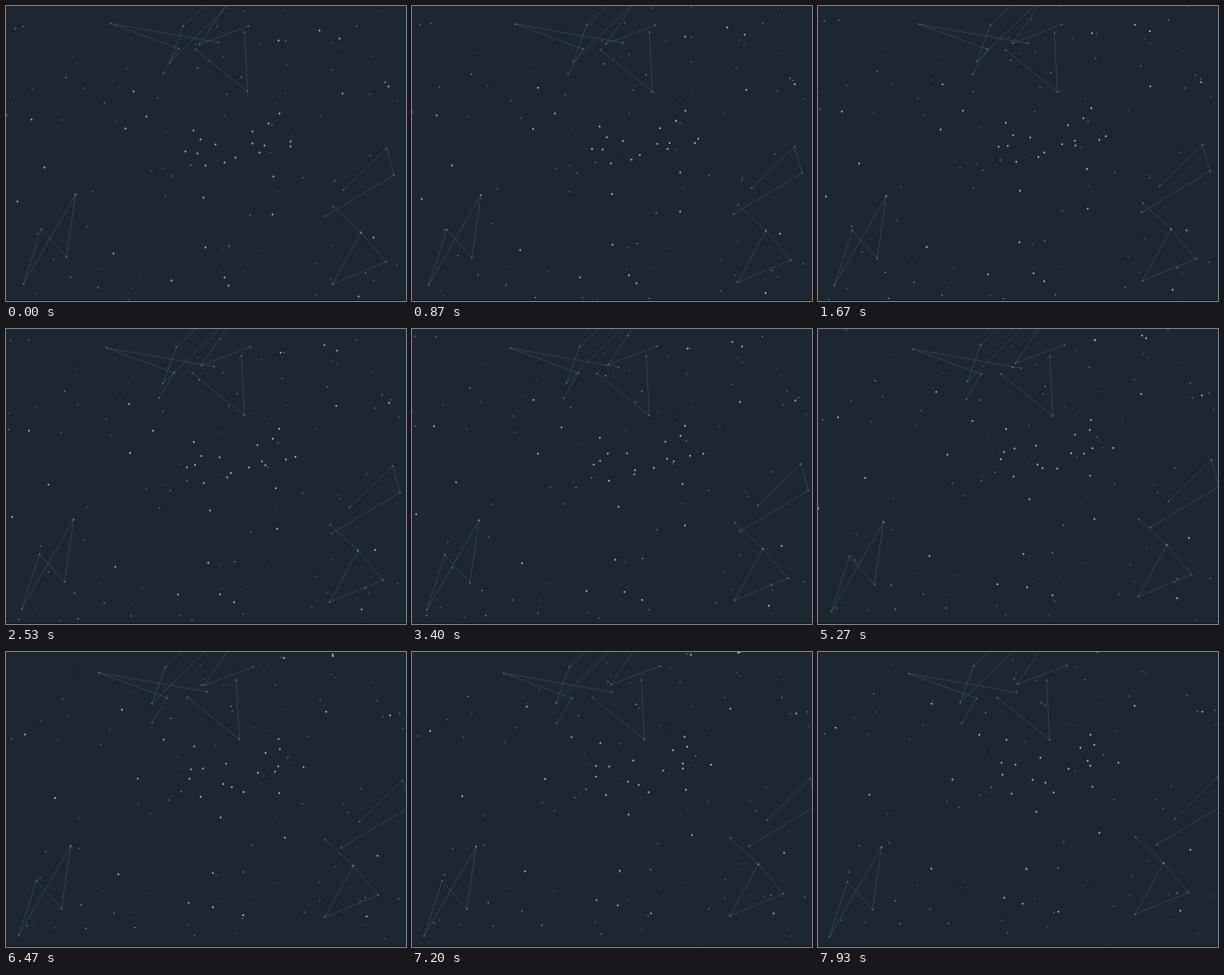
Recreate the animation shown at these times as an HTML page with a canvas. Size 400 px wide and 295 px high, loop 8000 ms.

```html
<!DOCTYPE html>
<html lang="en">
<head>
<meta charset="utf-8">
<title>Drifting stars</title>
<style>
  html, body { margin: 0; width: 100%; height: 100%; overflow: hidden; background: #1c2731; }
  canvas { display: block; }
</style>
</head>
<body>
<canvas id="sky" width="400" height="295"></canvas>
<script>
const WIDTH = 400, HEIGHT = 295;
const LOOP = 8000, FRAME = 1000 / 15, TRAVEL = 7930;
const ctx = document.getElementById('sky').getContext('2d');

// Each constellation is one stroke that drifts rigidly by `move` over TRAVEL ms.
const constellations = [
  { move: [-14, 4], points: [[157, 67], [172, 42], [104, 17], [212, 36]] },
  { move: [-21.5, -6], points: [[208, -10], [176.5, 19.5], [163, 56], [231, -10]] },
  { move: [-10, 2.3], points: [[189, 43], [241, 85], [238, 25.5]] },
  { move: [6, -6.5], points: [[220, -2], [193, 38], [242, 19.5]] },
  { move: [19.5, -17.5], points: [[337, 183.5], [380, 142], [387.5, 168.5], [319, 209.5]] },
  { move: [-9.5, -15.7], points: [[326.5, 200], [354.5, 226], [326, 277.5], [379.5, 255.5], [354.5, 226]] },
  { move: [-6, 6.7], points: [[69, 188], [17, 277.5], [35, 222.5], [60, 250.5], [69, 188]] }
];

// Bright stars: x, y, then drift over TRAVEL ms.
const brightStars = [
  [127, 85, -14, -34], [119, 122, 15, 5], [140, 110, 21, -28], [273, 107, -1, -25],
  [246, 125, 16, -30], [246, 137, -11, 3], [253, 146, 19, -33], [258, 139, -8, -23],
  [284, 135, 16, -25], [284, 140, -15, -32], [187, 124, 1, -37], [194, 133, 3, -21],
  [209, 138, 13, -33], [191, 147, -8, -37], [179, 145, 5, -23], [199, 159, -6, -18],
  [229, 151, -15, -24], [218, 156, 9, -26], [197, 191, 21, -32], [267, 170, 7, -36],
  [266, 208, 15, -28], [199, 241, 9, -25], [218, 271, -14, -20], [222, 279, 18, -20],
  [165, 274, 21, -29], [107, 247, 6, -31], [272, 34, 7, -35], [333, 32, -8, -35],
  [313, 24, 16, -27], [382, 80, 2, -21], [336, 87, -20, -34], [25, 113, -8, -38],
  [38, 161, 13, -19], [352, 290, 10, -32], [367, 231, 5, -34], [262, 117, 14, -25],
  [11, 195, -17, -24]
];

let seed = 71;
const random = () => (seed = seed * 16807 % 2147483647) / 2147483647;

const faintStars = Array.from({ length: 92 }, () => ({
  x: random() * WIDTH,
  y: random() * (HEIGHT + 25),
  dx: random() * 40 - 20,
  dy: -14 - random() * 24,
  alpha: 0.15 + random() * 0.45
}));

function dot(x, y, radius, alpha) {
  ctx.fillStyle = `rgba(185, 208, 212, ${alpha})`;
  ctx.beginPath();
  ctx.arc(x + 0.5, y + 0.5, radius, 0, Math.PI * 2);
  ctx.fill();
}

function drawConstellation({ move: [dx, dy], points }, progress) {
  const placed = points.map(([x, y]) => [x + dx * progress, y + dy * progress]);
  ctx.beginPath();
  placed.forEach(([x, y]) => ctx.lineTo(x + 0.5, y + 0.5));
  ctx.stroke();
  placed.forEach(([x, y]) => dot(x, y, 1, 0.3));
}

function draw(time) {
  const progress = Math.floor(time % LOOP / FRAME) * FRAME / TRAVEL;
  ctx.fillStyle = '#1c2731';
  ctx.fillRect(0, 0, WIDTH, HEIGHT);
  ctx.strokeStyle = 'rgba(185, 205, 215, 0.13)';
  ctx.lineWidth = 1;

  constellations.forEach(shape => drawConstellation(shape, progress));
  faintStars.forEach(s => dot(s.x + s.dx * progress, s.y + s.dy * progress, 0.8, s.alpha));
  brightStars.forEach(([x, y, dx, dy]) => dot(x + dx * progress, y + dy * progress, 0.95, 0.85));

  ctx.fillStyle = '#121a21';
  ctx.fillRect(0, HEIGHT - 1, WIDTH, 1);
}

const start = performance.now();
function tick() {
  draw(performance.now() - start);
  requestAnimationFrame(tick);
}
tick();
</script>
</body>
</html>
```
